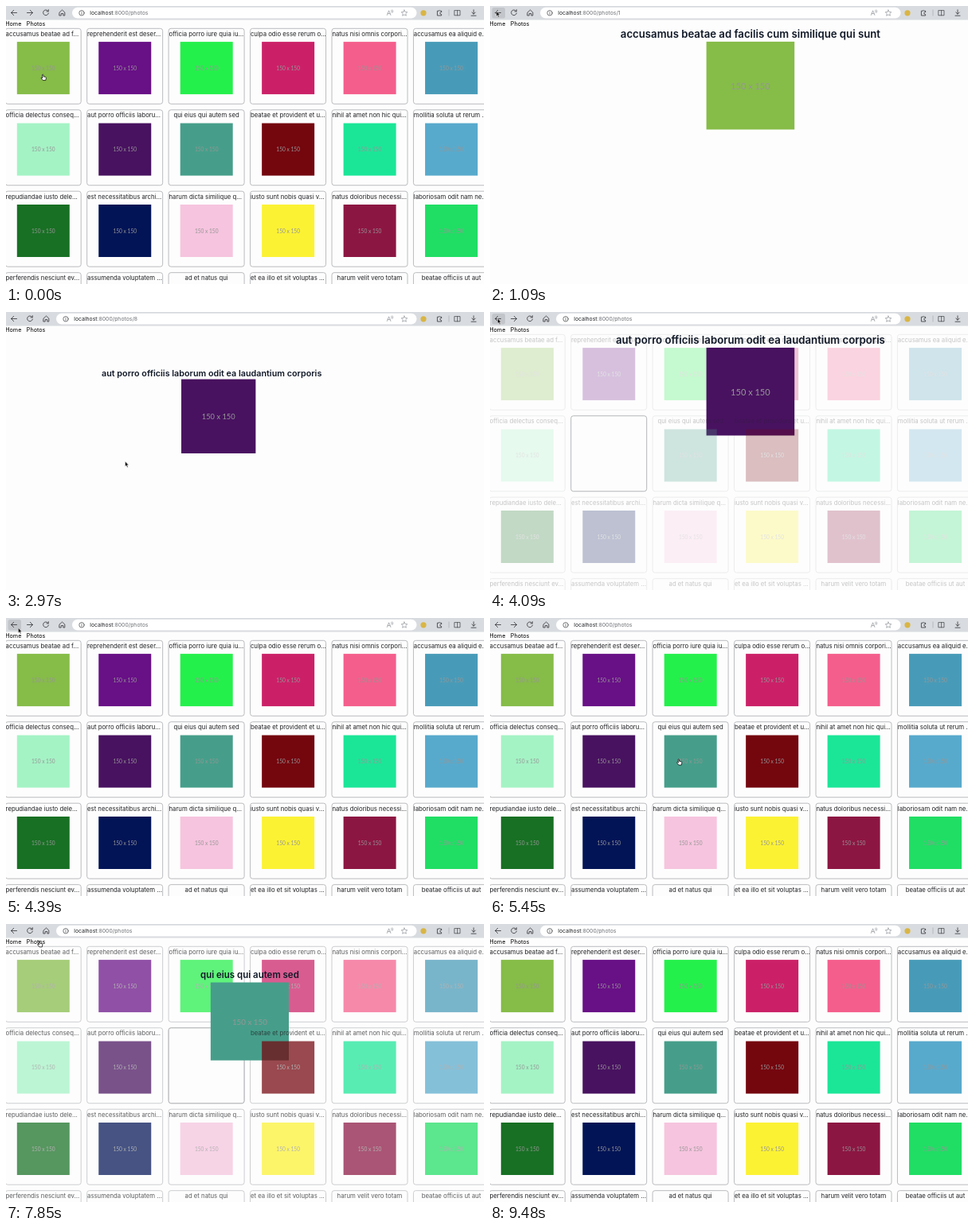
Animation of 600 by 350 pixels, one loop 9510 ms. Source, as an HTML page:

```html
<!DOCTYPE html>
<html lang="en">
<head>
<meta charset="utf-8">
<title>Photos</title>
<style>
  html, body { margin: 0; width: 100%; height: 100%; overflow: hidden; background: #fdfdfd; }
  svg { display: block; width: 600px; height: 350px; font-family: Inter, "Open Sans", sans-serif; }
  .card { fill: none; stroke: #b4b5b8; stroke-width: .9; }
  .name { font-size: 7.75px; fill: #202124; }
  .head { font-size: 13.2px; font-weight: 600; fill: #101827; text-anchor: middle; }
  .size { font: 6.6px Lato, "Liberation Sans", sans-serif; fill: #969696; text-anchor: middle; }
  .nav { font-size: 7.2px; fill: #000; }
  .url { font-size: 6.85px; fill: #1d1f22; }
  .icon { fill: none; stroke: #3b3d41; stroke-width: .85; stroke-linecap: round; stroke-linejoin: round; }
  .thin { stroke-width: .7; }
  .pale { stroke: #7d8086; stroke-width: .6; }
</style>
</head>
<body>
<svg viewBox="0 0 600 350">
  <rect width="600" height="350" fill="#fdfdfd"/>
  <g id="frames"></g>
  <rect id="slot" class="card" width="95" height="95" rx="3"/>
  <g id="cards">
    <g id="hero">
      <g id="photo">
        <rect id="fill" width="66" height="66"/>
        <text class="size" x="33" y="35.7">150 x 150</text>
      </g>
      <text id="small" class="name"/>
      <text id="head" class="head"/>
    </g>
  </g>

  <text class="nav" x="-.8" y="25.3">Home</text>
  <text class="nav" x="25.8" y="25.3">Photos</text>

  <rect width="600" height="17.5" fill="#d8dbdf"/>
  <rect id="hover" x="2.5" y="2" width="16.5" height="13.5" rx="2.5" fill="#c2c5c9"/>
  <path class="icon" d="M13.5 8.5H6.5M9.7 5.3L6.5 8.5L9.7 11.7"/>
  <path id="forward" class="icon" d="M26.5 8.5H33.5M30.3 5.3L33.5 8.5L30.3 11.7"/>
  <g id="tools">
    <path class="icon" d="M33 6.6A3.4 3.4 0 1 0 33.4 9M33.3 4.6V6.9H31"/>
    <path class="icon" d="M47.2 8L50.5 5L53.8 8V12H51.8V9.5H49.2V12H47.2Z"/>
  </g>
  <rect id="pill" y="1.8" height="13.8" rx="6.9" fill="#fff"/>
  <g id="address">
    <circle class="icon thin" cx="75" cy="8.8" r="3.2"/>
    <path class="icon thin" d="M75 8.6V10.3M75 7.2V7.3"/>
    <text class="url" x="85.3" y="11.1">localhost<tspan id="path" fill="#6d7075"></tspan></text>
  </g>
  <path class="icon pale" d="M478.3 11.5L480.6 5.8L482.9 11.5M479.2 9.6H482M483.6 5.5Q484.8 6.5 483.8 7.8M485 4.8Q486.6 6.5 485.2 8.4"/>
  <path id="star" class="icon pale"/>
  <path class="icon" d="M546.6 7.2V6.2H544.8Q544.2 4.6 543.2 6.2H541.4V12H546.6V10.6Q544.5 10.2 544.8 8.9Q545.1 7.8 546.6 7.2Z"/>
  <path d="M556 4.5V12.5" stroke="#a9acb0" stroke-width=".7"/>
  <path class="icon thin" d="M563.2 5.6H570V11.8H563.2ZM566.6 5.6V11.8"/>
  <path class="icon" d="M587 4.8V10M584.8 8L587 10.2L589.2 8M584 12.2H590"/>
  <circle cx="524" cy="8.8" r="3.6" fill="#d9b545"/>

  <g id="cursor">
    <path id="arrow" d="M0 0V6.6L1.5 5.2L2.6 7.7L3.7 7.2L2.6 4.8H4.6Z" fill="#111" stroke="#fff" stroke-width=".5"/>
    <path id="hand" d="M0 .5Q.7 -.3 1.3 .5L1.6 2.8L4.2 3.4Q5 3.7 4.9 4.6L4.3 7.6H.9L-1.4 4.9Q-1.5 3.9 -.5 4.2L.4 4.8Z" fill="#fff" stroke="#111" stroke-width=".8"/>
  </g>
</svg>
<script>
const LOOP = 9510, STEP = 102.45, MID = 326.9;
const $ = id => document.getElementById(id);
const set = (el, attrs) => { for (const k in attrs) el.setAttribute(k, attrs[k]); return el; };
const add = (parent, tag, attrs, text = '') => {
  const el = set(document.createElementNS('http://www.w3.org/2000/svg', tag), attrs);
  el.textContent = text;
  return parent.appendChild(el);
};
const clamp = v => Math.max(0, Math.min(1, v));
const lerp = (a, b, k) => a + (b - a) * k;
const smooth = k => k * k * (3 - 2 * k);
const show = (el, on) => el.setAttribute('visibility', on ? 'visible' : 'hidden');

const names = `accusamus beatae ad f...|reprehenderit est deser...|officia porro iure quia iu...|culpa odio esse rerum o...|natus nisi omnis corpori...|accusamus ea aliquid e...
officia delectus conseq...|aut porro officiis laboru...|qui eius qui autem sed|beatae et provident et u...|nihil at amet non hic qui...|mollitia soluta ut rerum ...
repudiandae iusto dele...|est necessitatibus archi...|harum dicta similique q...|iusto sunt nobis quasi v...|natus doloribus necessi...|laboriosam odit nam ne...
perferendis nesciunt ev...|assumenda voluptatem ...|ad et natus qui|et ea illo et sit voluptas ...|harum velit vero totam|beatae officiis ut aut`.split(/[|\n]/);
const colors = ('86bc48 681086 24f04b cb2068 f45e8c 489bb8 a4f3c5 481260 469e8a ' +
  '74060e 1be698 58aacc 187024 021456 f6c4de fcf234 8c1642 20de64').split(' ');

// Each visit: photo index, full title, fade-out, fly-in and return times
const visits = [
  { id: 0, title: 'accusamus beatae ad facilis cum similique qui sunt',
    out: [25, 65], fly: [440, 110], fadeIn: 1452, back: 1522, viaBack: true },
  { id: 7, title: 'aut porro officiis laborum odit ea laudantium corporis',
    out: [2577, 250], fly: [2827, 250], fadeIn: 4028, back: 4090, viaBack: true },
  { id: 8, title: 'qui eius qui autem sed',
    out: [6310, 250], fly: [6575, 250], fadeIn: 7670, back: 7764, viaBack: false }
];
const TURN = 250;

// Pointer stops: time, x, y
const stops = [[0, 45.5, 86], [430, 45.5, 86], [540, 8, 6.5], [1780, 8, 6.5], [2480, 149.5, 188],
  [3120, 149.5, 188], [3680, 9.5, 8], [4300, 9.5, 8], [5250, 236, 177.5], [6880, 236, 177.5],
  [7400, 41, 21.3], [8450, 41, 21.3], [8850, 110, -14], [LOOP, 110, -14]];

const cardAt = i => ({ x: -.8 + i % 6 * STEP, y: 28.3 + Math.floor(i / 6) * STEP });
const nameAttrs = (i, c) => names[i].endsWith('...')
  ? { x: c.x + .4, y: c.y + 9.7, 'text-anchor': 'start' }
  : { x: c.x + 47.5, y: c.y + 9.7, 'text-anchor': 'middle' };

const cells = names.map((name, i) => {
  const c = cardAt(i), cell = add($('cards'), 'g', {});
  add($('frames'), 'rect', { class: 'card', ...c, width: 95, height: 95, rx: 3 });
  add(cell, 'text', { class: 'name', ...nameAttrs(i, c) }, name);
  if (colors[i]) {
    add(cell, 'rect', { x: c.x + 14.6, y: c.y + 16.8, width: 66, height: 66, fill: '#' + colors[i] });
    add(cell, 'text', { class: 'size', x: c.x + 47.6, y: c.y + 52.5 }, '150 x 150');
  }
  return cell;
});

$('star').setAttribute('d', 'M' + Array.from({ length: 10 }, (_, i) => {
  const r = i % 2 ? 1.9 : 4, a = i * Math.PI / 5;
  return (500 + r * Math.sin(a)).toFixed(2) + ' ' + (9 - r * Math.cos(a)).toFixed(2);
}).join('L') + 'Z');

function drawHero(v, t) {
  const c = cardAt(v.id), cell = cells[v.id];
  // Keep the flying photo in its card's stacking place: later cards stay above it
  if ($('hero').nextSibling !== cell) $('cards').insertBefore($('hero'), cell);

  const leaving = t >= v.back;
  const k = leaving ? 1 - smooth(clamp((t - v.back) / TURN)) : smooth(clamp((t - v.fly[0]) / v.fly[1]));
  const size = lerp(66, 110.6, k);
  const cx = lerp(c.x + 47.6, MID, k);
  const y = lerp(c.y + 16.8, 44.9, k);
  const bow = leaving ? 0 : 36 * k * (1 - k);
  set($('photo'), { transform: `translate(${cx + bow - size / 2} ${y}) scale(${size / 66})` });
  $('fill').setAttribute('fill', '#' + colors[v.id]);

  const bold = clamp(k / .25);
  $('head').textContent = v.title;
  set($('head'), { opacity: bold,
    transform: `translate(${cx} ${lerp(c.y + 9.7, 39.7, k) + bow * .22}) scale(${lerp(.53, 1, k)})` });
  $('small').textContent = names[v.id];
  set($('small'), { ...nameAttrs(v.id, c), opacity: 1 - bold,
    transform: `translate(${cx - c.x - 47.6} ${lerp(0, 30 - c.y, k)})` });
  set($('slot'), c);
}

function drawBar(detail, canForward) {
  const shift = canForward ? 20 : 0;
  show($('forward'), canForward);
  set($('tools'), { transform: `translate(${shift} 0)` });
  set($('address'), { transform: `translate(${shift} 0)` });
  set($('pill'), { x: 63 + shift, width: 452.5 - shift });
  $('path').textContent = ':8000/photos' + (detail ? '/' + (detail.id + 1) : '');
}

function drawCursor(t, detail) {
  const n = Math.max(1, stops.findIndex(s => s[0] > t));
  const [a, b] = [stops[n - 1], stops[n]];
  const k = smooth(clamp((t - a[0]) / (b[0] - a[0])));
  const x = lerp(a[1], b[1], k), y = lerp(a[2], b[2], k);
  const onLink = y > 17 && y < 28 && x < 50;
  const hand = onLink || (!detail && y > 28);
  set($('cursor'), { transform: `translate(${x} ${y})` });
  show($('hand'), hand);
  show($('arrow'), !hand);
  show($('hover'), x < 19 && y < 16);
}

function draw(t) {
  const active = visits.find(v => t >= v.out[0] && t < v.back + TURN);
  const detail = visits.find(v => t >= v.fly[0] && t < v.fadeIn);
  const last = visits.filter(v => t >= v.fadeIn).pop();
  const fade = !active ? 1 : t < active.fadeIn
    ? 1 - clamp((t - active.out[0]) / active.out[1])
    : clamp((t - active.fadeIn) / TURN);
  $('frames').setAttribute('opacity', fade);
  cells.forEach((cell, i) => {
    cell.setAttribute('opacity', fade);
    show(cell, !active || active.id !== i);
  });
  show($('hero'), active);
  show($('slot'), active && t >= active.fadeIn);
  if (active) drawHero(active, t);
  drawBar(detail, !detail && (!last || last.viaBack));
  drawCursor(t, detail);
}

const start = performance.now();
function tick() {
  draw((performance.now() - start) % LOOP);
  requestAnimationFrame(tick);
}
tick();
</script>
</body>
</html>
```
